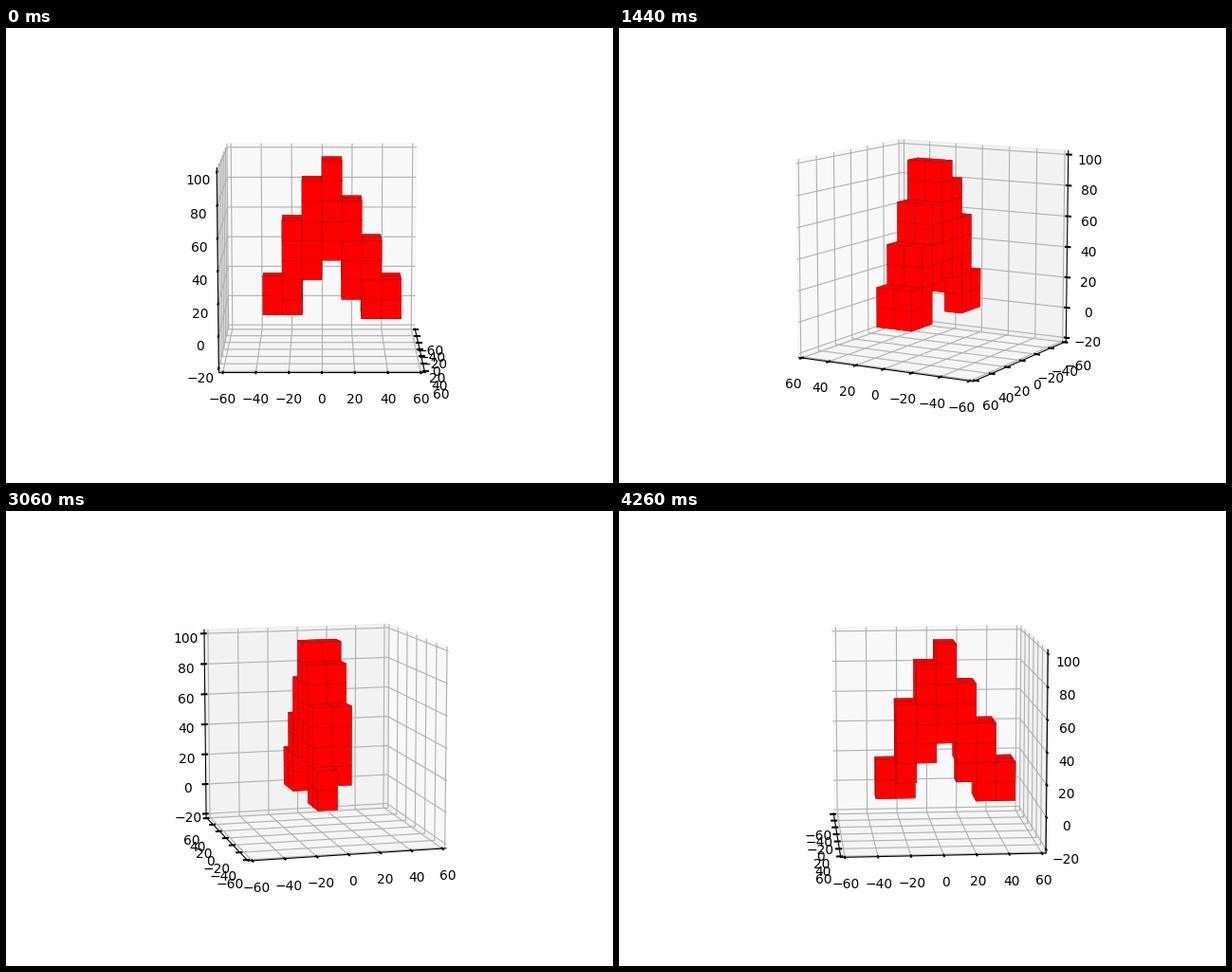
Recreate the animation shown at these times as a matplotlib script. Size 640 by 480 pixels, loop 4320 ms.

```python
import matplotlib.pyplot as plt
import numpy as np
from matplotlib.animation import FuncAnimation

FRAMES = 72
STEP = 360 / FRAMES
CUBE = 12.5
MID = 3  # index of the tallest column
UNIT_ZOOM = 3 ** 0.5 / 1.8294640721620434  # box edge of one unit per 120 data units


def build_cells():
    """Stepped arch, two cubes deep: axes are (depth, side, level)."""
    cells = np.zeros((2, 7, 8), dtype=bool)
    cells[:, MID, 3:] = True
    for k in range(3):  # right arm, down to its foot
        side, level = MID + k, 4 - 2 * k
        cells[:, side:side + 2, level:level + 2] = True
    for k in range(2):  # left arm
        side, level = MID - 1 - k, 4 - 2 * k
        cells[:, side:side + 2, level:level + 3] = True
    cells[0, :2, :2] = True  # left foot, rear half only
    cells[1, [MID - 2, MID + 1], 1] = True  # knees, front half only
    return cells


plt.rcParams.update({"xtick.major.width": 1.5, "ytick.major.width": 1.5})
fig = plt.figure(figsize=(6.4, 4.8), dpi=100)
ax = fig.add_subplot(projection="3d")

cells = build_cells()
x, y, z = np.indices(np.array(cells.shape) + 1) * CUBE
ax.voxels(x - CUBE, y - MID * CUBE, z, cells, facecolors="red",
          edgecolors="black", linewidth=0.1, shade=False)

ax.set_box_aspect((1, 1, 1), zoom=UNIT_ZOOM)
side_ticks = range(-60, 61, 20)
ax.set(xticks=side_ticks, yticks=side_ticks, zticks=range(-20, 101, 20))
ax.set(xlim=(-62.5, 62.5), ylim=(-62.5, 62.5), zlim=(-22.5, 102.5))


def update(i):
    ax.view_init(elev=10, azim=STEP * i)
    return []


anim = FuncAnimation(fig, update, frames=FRAMES, interval=60,
                     init_func=lambda: update(0), repeat=True, blit=False)
plt.show()
```
